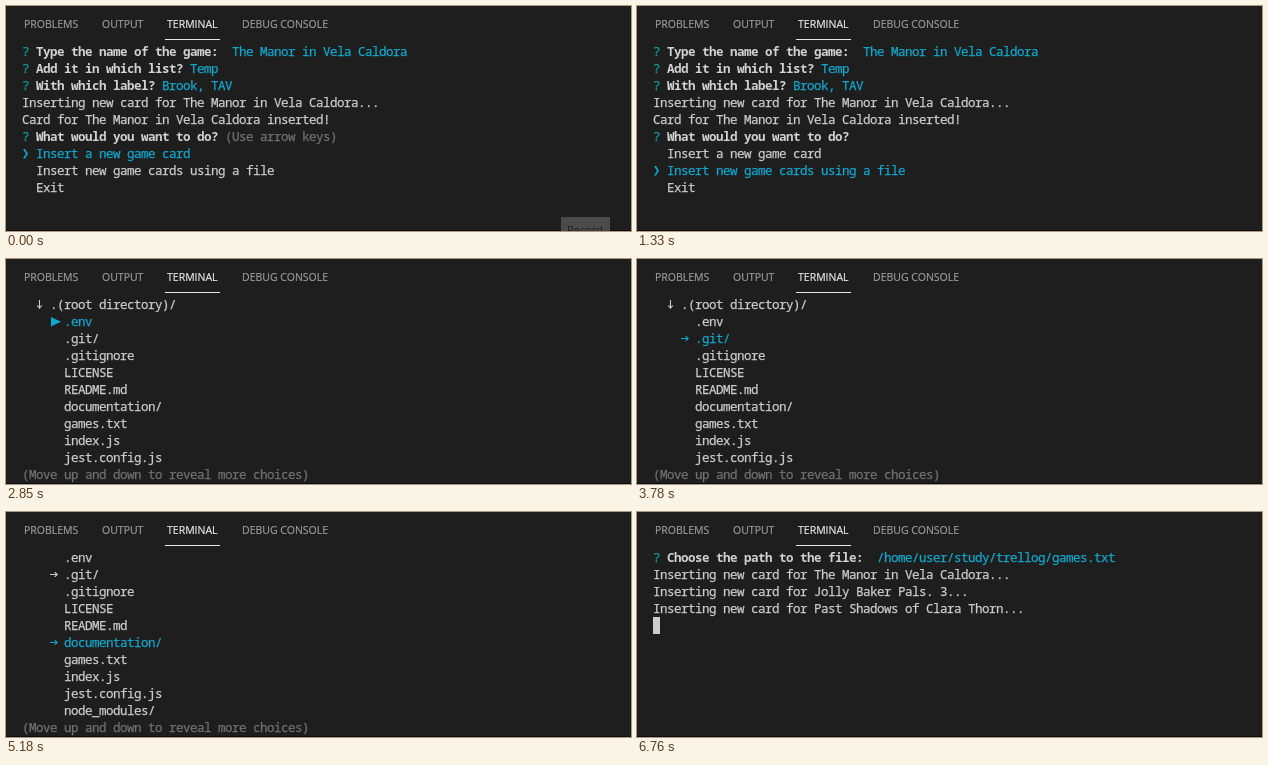
Recreate the animation shown at these times as an HTML page. Size 625 by 225 pixels, loop 8 s.

```html
<!DOCTYPE html>
<html lang="en">
<head>
<meta charset="utf-8">
<title>Terminal</title>
<style>
  html, body { margin: 0; width: 100%; height: 100%; overflow: hidden; background: #1e1e1e; }
  #stage { position: absolute; left: 0; top: 0; width: 625px; height: 225px; overflow: hidden; background: #1e1e1e; }
  #stage * { position: absolute; white-space: pre; }
  .tab { top: 10px; font: 10.5px/16px "Open Sans", "Noto Sans", sans-serif; color: #9a9a9a; -webkit-text-stroke: 0.2px; }
  .tab.on { color: #e7e7e7; }
  #underline { left: 159px; top: 33px; width: 55px; height: 1px; background: #e7e7e7; }
  #edge { left: 0; top: 224px; width: 625px; height: 1px; background: #0c0c0c; }
  #record { left: 555px; top: 211px; width: 49px; height: 14px; background: #4b4b4b; overflow: hidden; }
  #record span { left: 6px; top: 5px; font: 11px/16px "Open Sans", "Noto Sans", sans-serif; color: #1f1f1f; }
  #screen { left: 16px; top: 37px; font: 12.5px/17px "Noto Sans Mono", "DejaVu Sans Mono", monospace; letter-spacing: -0.5px; -webkit-text-stroke: 0.25px; }
  #screen svg { left: 0; top: 0; width: 14px; height: 17px; overflow: visible; }
  .text { color: #cccccc; }
  .bold { color: #d2d2d2; font-weight: 700; -webkit-text-stroke: 0; }
  .cyan { color: #11a8cd; }
  .mark { color: #12999c; }
  .dim { color: #707070; }
  .cursor { width: 7px; height: 17px; background: #cccccc; }
</style>
</head>
<body>
<div id="stage">
  <span class="tab" style="left:18px">PROBLEMS</span>
  <span class="tab" style="left:96px">OUTPUT</span>
  <span class="tab on" style="left:161px">TERMINAL</span>
  <span class="tab" style="left:236px">DEBUG CONSOLE</span>
  <div id="underline"></div>
  <div id="screen"></div>
  <div id="edge"></div>
  <div id="record"><span>Record</span></div>
</div>
<script>
const LOOP = 8000, CELL = 7, LINE = 17, PAGE = 10;
const GAME = "The Manor in Vela Caldora";

const line = d => `<path d="${d}" fill="none" stroke="currentColor" stroke-width="1.1"/>`;
const ICONS = {
  pointer: '<path d="M1 4H3L6 8.7L3 13.4H1L4 8.7Z" fill="currentColor"/>',
  play: '<path d="M1 4L11 8.7L1 13.4Z" fill="currentColor"/>',
  right: line("M0 8.5H7M4.7 6.2L7.2 8.5L4.7 10.8"),
  down: line("M3.5 4V12M1.2 9.5L3.5 12.2L5.8 9.5")
};

// A row is a list of parts: [column, text, style] or [column, icon markup, style, true]
const part = (col, text, style = "text") => [col, text, style];
const icon = (col, name, style = "text") => [col, `<svg>${ICONS[name]}</svg>`, style, true];
const cursor = () => [[0, "", "cursor"]];
const say = text => [part(0, text)];
const ask = (question, answer, gap = 1, style = "cyan") => [
  part(0, "?", "mark"),
  part(2, question, "bold"),
  part(2 + question.length + gap, answer, style)
];
const adding = name => say(`Inserting new card for ${name}...`);

const history = [
  ask("Type the name of the game:", GAME, 2),
  ask("Add it in which list?", "Temp"),
  ask("With which label?", "Brook, TAV"),
  adding(GAME),
  say(`Card for ${GAME} inserted!`)
];

function menu(active, hint) {
  const items = ["Insert a new game card", "Insert new game cards using a file", "Exit"];
  return [
    ...history,
    ask("What would you want to do?", hint, 1, "dim"),
    ...items.map((item, i) => i === active
      ? [icon(0, "pointer", "cyan"), part(2, item, "cyan")]
      : [part(2, item)])
  ];
}

const files = [".(root directory)/", ".env", ".git/", ".gitignore", "LICENSE", "README.md",
  "documentation/", "games.txt", "index.js", "jest.config.js", "node_modules/", "package.json"];

// Folders show an arrow once they have been visited; the page scrolls past the sixth row
function tree(active) {
  const first = Math.max(0, active - 5);
  const rows = files.slice(first, first + PAGE).map((name, k) => {
    const i = first + k, style = i === active ? "cyan" : "text";
    if (i === 0) return [icon(2, "down"), part(4, name)];
    const row = [part(6, name, style)];
    if (name.endsWith("/")) {
      if (i <= active) row.push(icon(4, "right", style));
    } else if (i === active) row.push(icon(4, "play", style));
    return row;
  });
  return [...rows, [part(0, "(Move up and down to reveal more choices)", "dim")]];
}

const result = [
  ask("Choose the path to the file:", "/home/user/study/trellog/games.txt", 2),
  adding(GAME),
  adding("Jolly Baker Pals. 3"),
  adding("Past Shadows of Clara Thorn"),
  cursor()
];

const steps = [
  [0, menu(0, "(Use arrow keys)")],
  [1330, menu(1, "")],
  [2790, [...history, cursor()]],
  [2850, tree(1)],
  [3780, tree(2)],
  [3910, tree(3)],
  [4180, tree(4)],
  [4370, tree(5)],
  [5180, tree(6)],
  [5640, tree(7)],
  [6760, result]
];

const screenBox = document.getElementById("screen");
const record = document.getElementById("record");

function draw(rows) {
  screenBox.replaceChildren();
  rows.forEach((row, y) => row.forEach(([col, body, style, markup]) => {
    const el = document.createElement("span");
    el.className = style;
    el.style.left = col * CELL + "px";
    el.style.top = y * LINE + "px";
    el[markup ? "innerHTML" : "textContent"] = body;
    screenBox.append(el);
  }));
}

const start = performance.now();
let shown = null;

function tick() {
  const t = (performance.now() - start) % LOOP;
  const step = steps.findLast(([from]) => from <= t);
  if (step !== shown) draw((shown = step)[1]);
  record.style.visibility = t < 70 ? "visible" : "hidden";
  requestAnimationFrame(tick);
}
tick();
</script>
</body>
</html>
```
